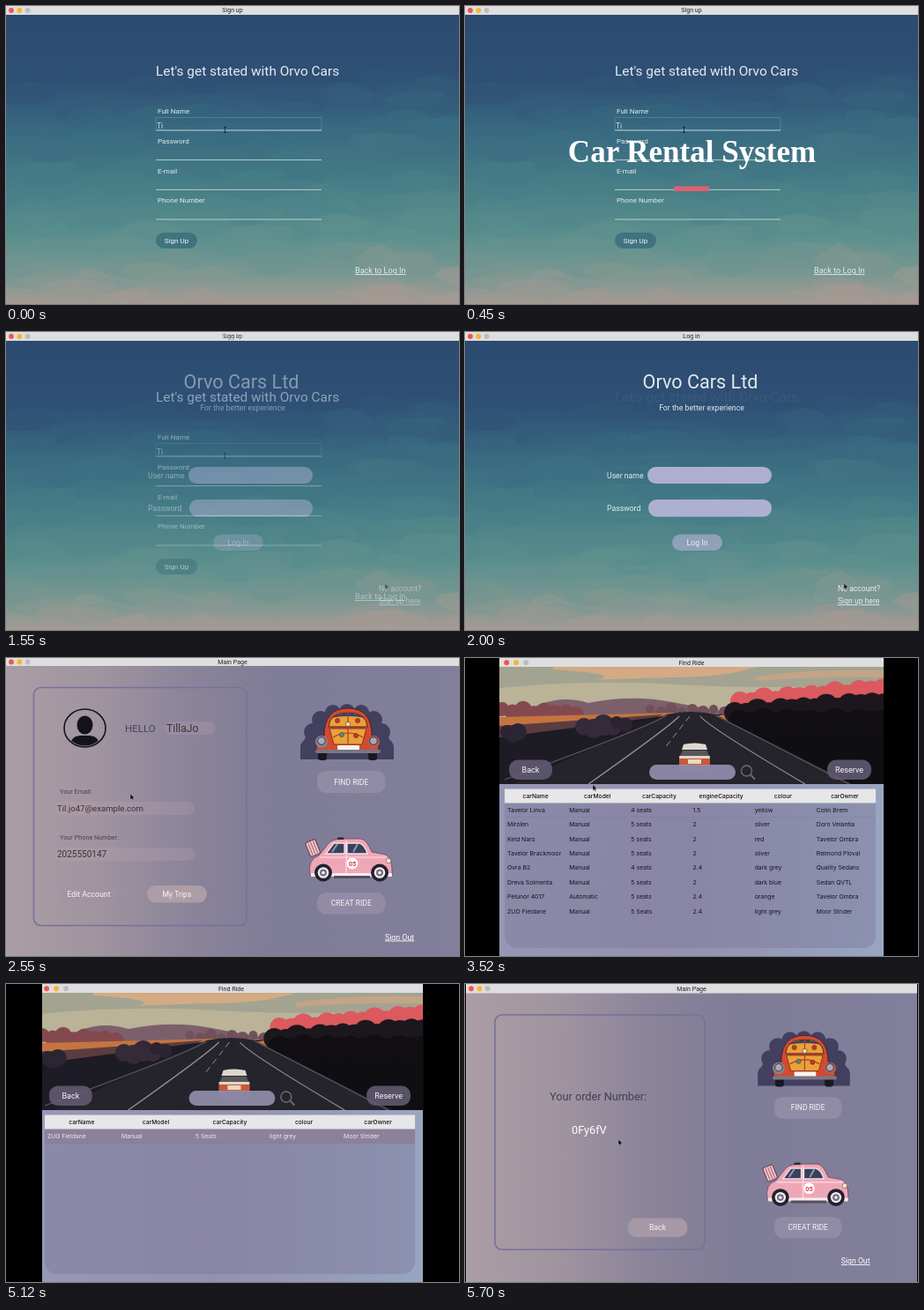
An HTML page for the animation above (6510 ms loop, 514 by 338 pixels).

```html
<!DOCTYPE html>
<html lang="en">
<head>
<meta charset="utf-8">
<title>Car Rental System</title>
<style>
html, body { margin: 0; width: 100%; height: 100%; overflow: hidden; background: #000; }
svg { display: block; width: 100vw; height: 100vh; font-family: Roboto, Inter, sans-serif; }
.title { font: bold 35px "Liberation Serif", serif; }
.wide { font-family: Inter, sans-serif; }
</style>
</head>
<body>
<svg id="stage" viewBox="0 0 514 338"></svg>
<script>
const LOOP = 6510;
const MID = 'text-anchor="middle"', LINK = 'text-decoration="underline"';
const BRAND = 'Orvo Cars', ORDER = '0Fy6fV';

// Drawing helpers
const text = (x, y, s, size, fill = '#fff', extra = '') =>
  `<text x="${x}" y="${y}" font-size="${size}" fill="${fill}" ${extra}>${s}</text>`;
const rect = (x, y, x2, y2, fill, r = 0, extra = '') =>
  `<rect x="${x}" y="${y}" width="${x2 - x}" height="${y2 - y}" rx="${r}" fill="${fill}" ${extra}/>`;
const path = (d, fill, extra = '') => `<path d="${d}" fill="${fill}" ${extra}/>`;
const line = (d, stroke, width = 1) => path(d, 'none', `stroke="${stroke}" stroke-width="${width}"`);
const dot = (x, y, r, fill, extra = '') => `<circle cx="${x}" cy="${y}" r="${r}" fill="${fill}" ${extra}/>`;
const group = (id, ...parts) => `<g id="${id}">${parts.join('')}</g>`;
const move = (transform, ...parts) => `<g transform="${transform}">${parts.join('')}</g>`;
const button = (x, y, x2, y2, fill, label, size = 8.7) =>
  rect(x, y, x2, y2, fill, Math.min(10, (y2 - y) / 2)) + text((x + x2) / 2, (y + y2) / 2 + 3, label, size, '#f6f4f8', MID);
const cursor = (x, y) => move(`translate(${x} ${y}) scale(.72)`,
  path('M0 0v9.5l2.2-2 1.6 3.4 1.5-.7-1.6-3.2h3z', '#0b0b10', 'stroke="#ddd" stroke-width=".5"'));
const gradient = (id, stops, vertical) =>
  `<linearGradient id="${id}" x2="${vertical ? 0 : 1}" y2="${vertical ? 1 : 0}">` +
  stops.map(([at, color]) => `<stop offset="${at}" stop-color="${color}"/>`).join('') + '</linearGradient>';

const lights = (x, y, step, colors) => colors.map((c, i) => dot(x + i * step, y, 2.9, c)).join('');
const ACTIVE = ['#f2544c', '#f5b52e', '#bdbdbd'], IDLE = ['#bcbcbc', '#bcbcbc', '#bcbcbc'];
const titleBar = (x, x2, h, label, firstLight = x + 6, step = 9.3) =>
  rect(x, 0, x2, h, '#dedede') + lights(firstLight, h / 2, step, ACTIVE) +
  text((x + x2) / 2, h / 2 + 2.4, label, 7.1, '#222', MID);

// Painted sea behind the sign-up and log-in pages
const SEA = [[0, '#2c4a70'], [.25, '#2f5075'], [.42, '#386a80'], [.6, '#467d87'], [.78, '#5c908e'], [.9, '#7a9791'], [1, '#a59a94']];
let seed = 7;
const random = () => (seed = seed * 16807 % 2147483647) / 2147483647;
function seaColor(at) {
  at = Math.max(0, Math.min(1, at));
  const i = Math.max(1, SEA.findIndex(s => s[0] >= at));
  const [a, from] = SEA[i - 1], [b, to] = SEA[i], k = (at - a) / (b - a);
  const channel = n => Math.round(parseInt(from.substr(n, 2), 16) * (1 - k) + parseInt(to.substr(n, 2), 16) * k);
  return `rgb(${[1, 3, 5].map(channel)})`;
}
function sea() {
  let out = rect(0, 0, 514, 338, 'url(#sea)');
  for (let i = 0; i < 130; i++) {
    const y = 80 + i * 2, x = random() * 540 - 15, w = 22 + random() * 30, h = 7 + random() * 9;
    const points = Array.from({ length: 8 }, (_, k) => {
      const a = k * Math.PI / 4, r = .75 + random() * .4;
      return [x + Math.cos(a) * w * r, y + Math.sin(a) * h * r].map(v => v.toFixed(1));
    });
    const warm = x > 370 ? .05 : 0;
    out += `<polygon points="${points.join(' ')}" fill="${seaColor(y / 338 + warm + random() * .08 - .04)}" opacity=".5"/>`;
  }
  return out;
}
const seaArt = sea();

function signUp() {
  const ink = '#e4ecee';
  const fields = ['Full Name', 'Password', 'E-mail', 'Phone Number'].map((label, i) =>
    text(172, 122 + i * 33.8, label, 8.1, ink) + rect(170, 140.5 + i * 33.7, 358, 141.4 + i * 33.7, '#c3d2d6'));
  return group('signUp', seaArt, titleBar(0, 514, 10, 'Sign up'),
    text(170, 79, `Let's get stated with ${BRAND}`, 15.4, ink),
    rect(170, 126.5, 358, 141, 'none', 0, 'stroke="#4b8797" stroke-width=".9"'), ...fields,
    text(171, 139, 'Ti', 8.5, '#d3dfe2'),
    line('M247 137.5h3M248.5 137.5v6M247 143.5h3', '#15232d', .8),
    button(170, 257, 217, 275, '#3f747f', 'Sign Up', 8),
    text(396, 303, 'Back to Log In', 9.1, ink, LINK));
}

function logIn() {
  const ink = '#eef3f5';
  return group('logIn', seaArt, titleBar(0, 514, 10, 'Log in'),
    text(267, 64, BRAND + ' Ltd', 21.6, ink, MID),
    text(268.5, 89, 'For the better experience', 8.76, ink, MID),
    text(161, 166, 'User name', 8.7, ink), rect(207, 153, 348, 172, '#b5b4d6', 9.5),
    text(161, 203, 'Password', 8.7, ink), rect(208, 190, 348, 209.5, '#b5b4d6', 9.5),
    button(235, 229.5, 292, 248, '#93a3bd', 'Log In', 8.8),
    text(423, 294, 'No account?', 8.6, ink), text(423, 308, 'Sign up here', 8.6, ink, LINK), cursor(430, 285));
}

function flowerCar() {
  const bush = [[343, 101, 9], [348, 84, 10], [357, 70, 10], [371, 62, 9], [387, 61, 9], [403, 62, 9], [417, 70, 10], [426, 84, 10], [431, 101, 9]];
  return bush.map(b => dot(...b, '#433f5f')).join('') + path('M334 101L352 68H422L440 101V115H334z', '#433f5f') +
    rect(354, 101, 364, 116, '#191822', 3) + rect(411, 101, 421, 116, '#191822', 3) +
    path('M361 88Q361 57 388 57T415 88L423 98V107H352V98z', '#d34a2e', 'stroke="#2b2030" stroke-width=".8"') +
    path('M366 78Q367 62 388 62T410 78z', '#e9a235', 'stroke="#4a2430"') +
    path('M367 80H409L404 98H372z', '#e9a235', 'stroke="#8c2f2c"') +
    path('M368 68Q388 57 408 68Q388 64 368 68z', '#3d4260') + line('M388 62V97M371 90Q388 80 405 90', '#b23a2d', 1.2) +
    [[376, 71, '#c93335'], [399, 71, '#c93335'], [381, 87, '#4c8e8b'], [397, 88, '#c93335'], [388, 75, '#f4dfb0']]
      .map(([x, y, c]) => dot(x, y, 2.6, c, 'stroke="#632c32" stroke-width=".6"')).join('') +
    dot(358, 95, 7, '#858292') + dot(417, 95, 7, '#b55b50') +
    [358, 417].map(x => dot(x, 94, 4.3, '#a9a9b8', 'stroke="#3b3445"')).join('') +
    rect(351, 104, 425, 108, '#777687', 2) + rect(376, 99, 401, 104, '#f7f3ef', 1);
}

function pinkCar() {
  const wheel = x => dot(x, 243.5, 10, '#23212e') + dot(x, 243.5, 6.3, '#f5eef0') + dot(x, 243.5, 4, '#777184') + dot(x, 243.5, 1.7, '#fff');
  return move('rotate(-22 348 215)', rect(342, 207, 354, 224, '#f0c6cc', 2, 'stroke="#633d50"'), line('M345 208v15M348 208v15M351 208v15', '#a95c70')) +
    path('M345 246Q342 228 355 224L367 209Q372 205 385 205H402Q409 205 415 220L431 223Q439 227 438 247H346z', '#efa7b8', 'stroke="#6b4157" stroke-width=".8"') +
    path('M363 222L372 210H384V222zM387 222V210H401Q407 212 410 222z', '#39405a', 'stroke="#f9e4e8" stroke-width="1.3"') +
    line('M370 220l6-9M394 220l5-9', '#8c9ab0', 2) +
    line('M386 207V245M356 226H432', '#fae0e5', 1.2) + rect(376, 203.5, 383, 206, '#2b2938') +
    rect(346, 244, 438, 248, '#f8ecee', 1) + rect(372, 247, 413, 250, '#554d60') + wheel(360) + wheel(424) +
    dot(393, 233, 6.4, '#fff') + text(393, 236, '05', 7.5, '#d63b4a', MID + ' font-weight="bold"') +
    dot(434, 230, 2.8, '#f9e8bd', 'stroke="#6b4157" stroke-width=".6"');
}

const mainMenu = () => rect(31.5, 33.5, 273, 303.5, 'none', 8, 'stroke="#74729a" stroke-width="1.6"') +
  flowerCar() + button(353, 128, 430.5, 153, '#928ba5', 'FIND RIDE', 8.6) +
  pinkCar() + button(353, 266, 430.5, 290.5, '#928ba5', 'CREAT RIDE', 8.6) +
  text(430, 319.5, 'Sign Out', 8.8, '#fff', LINK);

function profile() {
  const ink = '#3d3239', label = '#48415a', soft = 'rgba(190,165,175,.25)';
  return group('profile', rect(0, 0, 514, 338, 'url(#dusk)'), titleBar(0, 514, 9, 'Main Page'), mainMenu(),
    '<clipPath id="face"><ellipse cx="89.5" cy="79.5" rx="22" ry="20"/></clipPath>',
    '<ellipse cx="89.5" cy="79.5" rx="23.5" ry="21.5" fill="none" stroke="#14131c" stroke-width="1.6"/>',
    `<g clip-path="url(#face)">${path('M72 102Q72 89 84 88H95Q107 89 107 102z', '#14131c')}</g>`,
    '<ellipse cx="89.5" cy="76" rx="9" ry="10.5" fill="#14131c"/>',
    text(135, 84, 'HELLO', 11.5, '#49435e'), rect(180, 72, 238, 87, soft, 7.5), text(182, 84, 'TillaJo', 12.2, ink),
    text(61, 153.5, 'Your Email:', 7.3, label), rect(56, 163, 214, 178, soft, 7.5), text(58, 173.5, 'Til.jo47@example.com', 9.6, ink),
    text(61, 206, 'Your Phone Number:', 7.3, label), rect(56, 215, 214, 230, soft, 7.5), text(58, 226, '2025550147', 10, ink),
    button(60, 258, 128, 278, 'rgba(165,145,158,.35)', 'Edit Account'), button(160, 258, 228, 277.5, '#ad9da6', 'My Trips'),
    cursor(141, 154));
}

const orderPage = () => group('order', rect(0, 0, 514, 338, '#000'), rect(1, 0, 513, 338, 'url(#dusk)'), titleBar(1, 513, 10.5, 'Main Page'),
  move('translate(2.9 2) scale(.986)', mainMenu()),
  text(96, 132, 'Your order Number:', 12.7, '#443e58'), text(121, 169.5, ORDER, 12.7),
  button(184.5, 265.5, 252.5, 287, '#a698a6', 'Back'), cursor(174, 176));

// Road at sunset, filling 39,10 to 475,143
function road() {
  const clump = (x, y, n, step, rise, r, fill) =>
    Array.from({ length: n }, (_, i) => dot(x + i * step, y + i * rise + (i % 2) * 3, r + i % 3, fill)).join('');
  const sky = rect(39, 10, 475, 143, '#a3a391') +
    path('M39 34Q140 24 240 30T475 30V75H39z', '#bab398') +
    path('M100 10H330Q300 21 240 22T150 25Q180 18 100 13z', '#d3aa84') +
    path('M330 21Q390 12 475 14V22Q400 21 330 26z', '#c3a486');
  const leftSide = path('M60 66Q100 38 140 51Q190 41 235 50T310 62V72H60z', '#7b606b') +
    clump(42, 58, 8, 12, .4, 8, '#84494f') + clump(210, 58, 8, 12, 0, 5, '#70505b') +
    path('M39 67L240 62L200 74L39 86z', '#c5743f') + path('M39 77L225 64L170 88L39 98z', '#5b3d3f') +
    path('M39 90L232 65L150 143H39z', '#1d1b23') +
    clump(135, 78, 4, 11, -1, 10, '#342a38') + clump(172, 73, 2, 10, 0, 7, '#2b232f') + clump(48, 84, 3, 6, 0, 8, '#2b2432');
  const rightSide = path('M262 66L475 50V143H380z', '#0f0e13') + path('M270 68L320 60V70L285 74z', '#c5743f') +
    clump(312, 49, 13, 13.5, -1.2, 11, '#dc5a5e') + clump(306, 62, 14, 13, -.9, 12, '#1c171d') +
    clump(312, 72, 13, 13.5, 0, 13, '#110f14');
  const lanes = path('M229 64Q256 58 284 64L440 143H55z', '#25232b') +
    line('M229 65Q205 80 45 138M284 65L436 143', '#5c565f', 1.2) +
    line('M243 66Q232 78 140 143M267 66Q276 78 386 143', '#99929a', 1.2) +
    path('M255 66L226 103', 'none', 'stroke="#99929a" stroke-width="1" stroke-dasharray="7 5"');
  const car = path('M243 131V113L248 98Q261 95 273 98L278 113V131z', '#302c35') +
    path('M248 98Q261 95 273 98L275 104H246z', '#dcd8ce') + path('M247 105H274L277 111H244z', '#5a5658') +
    rect(243, 111, 278, 114, '#ddd6ca', 1) + rect(243, 114, 278, 122, '#c9583c') + rect(253, 115, 268, 120, '#e8d9c5');
  return `<g clip-path="url(#view)">${sky}${leftSide}${rightSide}${lanes}${car}</g>`;
}
const roadArt = road();

const CARS = [
  ['Tavelor Linva', 'Manual', '4 seats', '1.5', 'yellow', 'Colin Brem'],
  ['Mirolen', 'Manual', '5 seats', '2', 'sliver', 'Dorn Velantia'],
  ['Keld Naro', 'Manual', '5 seats', '2', 'red', 'Tavelor Ombra'],
  ['Tavelor Brackmoor', 'Manual', '5 seats', '2', 'sliver', 'Relmond Ploval'],
  ['Ovra B2', 'Manual', '4 seats', '2.4', 'dark grey', 'Quality Sedans'],
  ['Dreva Solmenta', 'Manual', '5 seats', '2', 'dark blue', 'Sedan QVTL'],
  ['Pelunor 4017', 'Automatic', '5 seats', '2.4', 'orange', 'Tavelor Ombra'],
  ['ZUO Fieldane', 'Manual', '5 Seats', '2.4', 'light grey', 'Moor Strider']];
const HEADS = ['carName', 'carModel', 'carCapacity', 'engineCapacity', 'colour', 'carOwner'];

function table(heads, rows, ink) {
  const width = 421 / heads.length;
  return '<g class="wide">' + rect(45, 148.5, 466, 164.5, '#e7e6e8') +
    heads.map((h, i) => text(45 + (i + .5) * width, 159, h, 6.7, '#111', MID + ' font-weight="500"')).join('') +
    rows.map((row, r) => rect(45, 180.5 + r * 16.4, 466, 181, 'rgba(90,88,120,.25)') +
      row.map((cell, i) => text(48 + i * width, 174.8 + r * 16.4, cell, 6.85, ink)).join('')).join('') + '</g>';
}
const findPage = content => rect(39, 0, 475, 338, 'url(#haze)') + titleBar(39, 475, 10.5, 'Find Ride', 47.2, 11) + roadArt +
  button(50, 115.5, 99, 138, 'rgba(98,92,116,.88)', 'Back', 9) + button(411, 115.5, 461, 138, 'rgba(98,92,116,.88)', 'Reserve', 9) +
  rect(209, 121, 307, 138, 'rgba(155,151,184,.85)', 8.5) +
  dot(319.5, 128, 6, 'none', 'stroke="#6f6b75" stroke-width="1.4"') + line('M324 132.5l5 5', '#6f6b75', 1.8) +
  rect(45, 148.5, 466, 329, 'rgba(120,116,148,.4)', 14) + content;

const findAll = () => group('findAll', rect(0, 0, 514, 338, '#000'), findPage(table(HEADS, CARS, '#16131d')), cursor(145, 143.5));

function findOne() {
  const keep = (_, i) => i !== 3;
  const picked = rect(45, 164.5, 466, 180.5, '#8b8199') + table(HEADS.filter(keep), [CARS[7].filter(keep)], '#eeeaf2');
  return group('findOne', rect(0, 0, 514, 338, '#000'), move('translate(-1 0) scale(.998 1)', findPage(picked)), rect(37, 0, 41, 338, '#000'));
}

function reserve() {
  const ink = '#37324b';
  return group('reserve', lights(46.1, 5.25, 11, IDLE), rect(116, 16.5, 387, 300, '#fff', 3, 'filter="url(#shadow)"'),
    rect(116, 16.5, 387, 28, '#dedede', 3), lights(123, 22.3, 10.5, IDLE), text(251.5, 24.8, 'Reserve Cars', 7.4, '#777', MID),
    move('translate(91.8 21.8) scale(.6216 .66)', roadArt),
    line('M162 170V246', '#55505f'),
    dot(181, 199.5, 2.3, ink), rect(177, 202.5, 185, 208, ink, 1.5), rect(178.7, 204, 183.3, 214, ink),
    text(197, 208.5, '5 Seats', 8, ink),
    rect(263, 198, 285, 214, ink, 2), dot(269, 204, 2, '#fff'), path('M265.5 210Q269 205 272.5 210z', '#fff'), line('M275 204h7M275 208h7', '#fff', 1.3),
    rect(172, 228, 191, 242, ink, 2), line('M178 228v-3h7v3', ink, 1.5), line('M176 228v14M187 228v14', '#fff', .8),
    text(197, 236, 'light greyL', 8, ink), text(219, 272, 'Confirm Reservation', 9.25, ink, LINK), cursor(281, 267),
    rect(138, 107, 355, 192, '#e0e0e0', 3, 'filter="url(#glow)"'), rect(138, 107, 355, 117.5, '#d3d3d3', 3), lights(145, 112.3, 11, ['#ee4c44', '#bcbcbc', '#bcbcbc']),
    path('M153 143Q154 131 168 131T183 143Q183 153 173 155L176 160L166 156Q153 154 153 143z', '#f7f7f7', 'stroke="#aaa" stroke-width=".8"'),
    text(168, 151, '!', 22, '#333', MID + ' font-weight="bold"'),
    text(193, 133, 'Thank you! Your order number is: ' + ORDER, 7.2, '#111', 'class="wide" font-weight="bold"'),
    rect(301, 165, 339, 178, '#1764d4', 2.5), text(320, 174, 'OK', 7, '#fff', MID));
}

const shadow = (id, dy, blur, opacity) => `<filter id="${id}" x="-30%" y="-30%" width="160%" height="190%">` +
  `<feDropShadow dx="0" dy="${dy}" stdDeviation="${blur}" flood-opacity="${opacity}"/></filter>`;

const stage = document.getElementById('stage');
stage.innerHTML = '<defs>' + gradient('sea', SEA, true) +
  gradient('dusk', [[0, '#aa9da5'], [.2, '#a0949f'], [.4, '#8b849a'], [.6, '#7f7c97'], [1, '#827f9c']]) +
  gradient('haze', [[0, '#9798b6'], [.45, '#9491b0'], [.75, '#959bb8'], [1, '#98a6c1']]) +
  '<clipPath id="view"><rect x="39" y="10" width="436" height="133"/></clipPath>' +
  '<clipPath id="reveal"><rect x="100" y="130" width="314" height="76"/></clipPath>' +
  shadow('shadow', 5, 7, .55) + shadow('glow', 9, 10, .65) + '</defs>' +
  signUp() +
  group('intro', `<g clip-path="url(#reveal)">${text(257.5, 177, 'Car Rental System', 35, '#fff', MID + ' class="title" id="headline"')}</g>`,
    '<rect id="bar" y="204.5" height="5.5" fill="#e0606f"/>') +
  logIn() + profile() + findAll() + findOne() + reserve() + orderPage();

const node = id => document.getElementById(id);
const ramp = (t, from, to) => Math.max(0, Math.min(1, (t - from) / (to - from)));
function show(id, opacity) {
  node(id).style.display = opacity > 0 ? '' : 'none';
  node(id).style.opacity = opacity;
}

function draw() {
  const t = performance.now() % LOOP;
  // The headline rises out of the bar and sinks back the same way
  const away = Math.max(0, Math.abs(t - 485) - 35);
  const width = 40 * (1 - ramp(away, 300, 420));
  node('headline').setAttribute('y', 177 + 58 * ramp(away, 0, 330) ** 1.7);
  node('bar').setAttribute('x', 257 - width / 2);
  node('bar').setAttribute('width', width);

  show('signUp', +(t < 2550));
  show('intro', +(t > 30 && t < 940));
  show('logIn', t < 2550 ? ramp(t, 1120, 2060) : 0);
  show('profile', t < 3520 ? ramp(t, 2420, 2550) : 0);
  show('findAll', +(t >= 3520 && t < 4670));
  show('findOne', +(t >= 4670 && t < 5670));
  show('reserve', t >= 4670 ? 1 - ramp(t, 4980, 5120) : 0);
  show('order', +(t >= 5670));
  requestAnimationFrame(draw);
}
draw();
</script>
</body>
</html>
```
